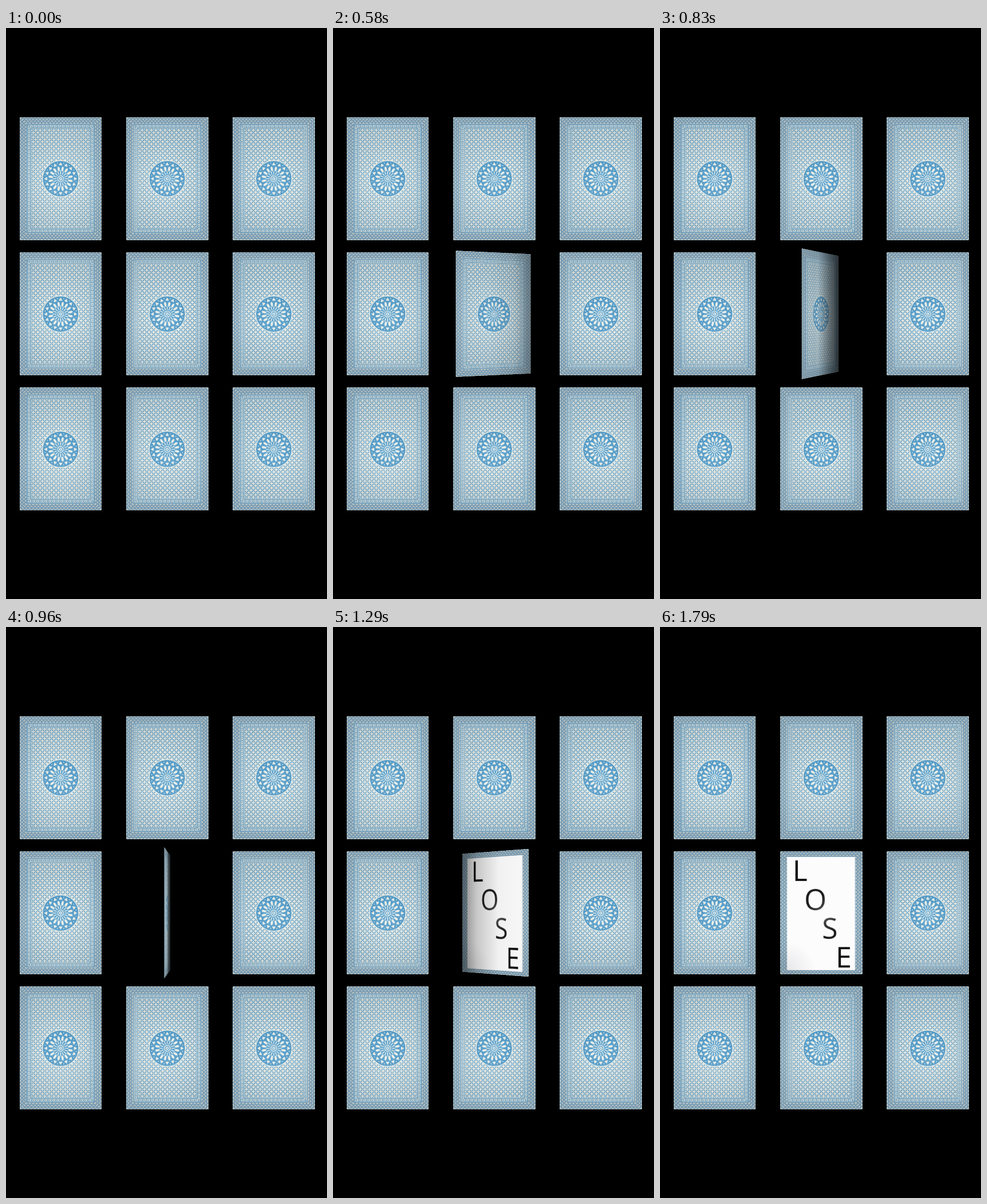
An HTML page with a canvas for the animation above (1830 ms loop, 561 by 998 pixels).

```html
<!DOCTYPE html>
<html lang="en">
<head>
<meta charset="utf-8">
<title>Card flip</title>
<style>
html, body { margin: 0; width: 100%; height: 100%; overflow: hidden; background: #000; }
canvas { display: block; }
</style>
</head>
<body>
<canvas id="stage" width="561" height="998"></canvas>
<script>
const LOOP = 1830, W = 143.4, H = 215, RES = 3, DEPTH = 1060;
const BLUE = '#5aa0cc', DEEP = '#6b9dc2', CREAM = '#f2f4ec';
const COLS = [23.8, 210.1, 396.4], ROWS = [155.5, 392, 628.4];
const ctx = document.getElementById('stage').getContext('2d');
ctx.imageSmoothingQuality = 'high';

function makeFace(paint) {
  const c = document.createElement('canvas');
  c.width = Math.round(W * RES);
  c.height = H * RES;
  const g = c.getContext('2d');
  g.scale(RES, RES);
  g.beginPath();
  g.roundRect(0, 0, W, H, 1.2);
  g.clip();
  paint(g);
  return c;
}

function rect(g, x, y, w, h, color) {
  g.fillStyle = color;
  g.fillRect(x, y, w, h);
}

function disc(g, x, y, r, color) {
  g.fillStyle = color;
  g.beginPath();
  g.arc(x, y, r, 0, Math.PI * 2);
  g.fill();
}

// Pointed leaf from (x, y) along an angle
function leaf(g, x, y, len, wide, angle, color) {
  g.save();
  g.translate(x, y);
  g.rotate(angle);
  g.fillStyle = color;
  g.beginPath();
  g.moveTo(0, 0);
  g.quadraticCurveTo(len / 2, wide, len, 0);
  g.quadraticCurveTo(len / 2, -wide, 0, 0);
  g.fill();
  g.restore();
}

function radial(g, x, y, r, from, to) {
  const grad = g.createRadialGradient(x, y, 0, x, y, r);
  grad.addColorStop(0, from);
  grad.addColorStop(1, to);
  rect(g, 0, 0, W, H, grad);
}

// One side of the frame, x along the edge and y inward
function side(g, len) {
  g.beginPath();
  g.moveTo(0, 0);
  g.lineTo(len, 0);
  g.lineTo(len - 21, 21);
  g.lineTo(21, 21);
  g.clip();
  rect(g, 0, 0, len, 21, DEEP);
  for (let row = 0; row < 4; row++) {
    const y = 1.2 + row * 3.1;
    for (let x = len / 2 % 6 - 6 + (row % 2) * 3; x < len; x += 6)
      leaf(g, x, y, 5.8, 2.3, 0, '#e2e5da');
  }
  rect(g, 0, 12, len, .9, '#e2e9e6');
  rect(g, 0, 12.9, len, 1.2, BLUE);
  rect(g, 0, 14.1, len, 4.6, CREAM);
  for (let x = len / 2 % 7 - 7; x < len; x += 7) {
    leaf(g, x, 14.3, 4.2, 1.1, Math.PI / 4, BLUE);
    leaf(g, x, 18.5, 4.2, 1.1, -Math.PI / 4, BLUE);
    leaf(g, x + 3.5, 16.4, 3.6, 1.6, 0, BLUE);
  }
  rect(g, 0, 18.7, len, 1.2, BLUE);
  rect(g, 0, 19.9, len, 1.1, CREAM);
}

function frame(g) {
  for (let i = 0; i < 4; i++) {
    g.save();
    g.translate(W / 2, H / 2);
    g.rotate(i * Math.PI / 2);
    const len = i % 2 ? H : W, off = i % 2 ? W : H;
    g.translate(-len / 2, -off / 2);
    side(g, len);
    g.restore();
  }
}

function lattice(g) {
  const x0 = 20, y0 = 19.5, nx = 13, ny = 22;
  const px = (W - 40) / nx, py = (H - 39) / ny;
  rect(g, 19, 18, W - 38, H - 36, '#f1f2e9');
  for (let j = 0; j < ny; j++)
    for (let i = 0; i < nx; i++)
      for (let k = 0; k < 4; k++)
        leaf(g, x0 + (i + .5) * px, y0 + (j + .5) * py, 5.6, 1.6, Math.PI / 4 + k * Math.PI / 2, BLUE);
}

function medallion(g) {
  const n = 16;
  g.save();
  g.translate(71.6, 108);
  disc(g, 0, 0, 32.2, CREAM);
  disc(g, 0, 0, 30.9, '#4c9aca');
  for (let i = 0; i < n; i++) {
    g.save();
    g.rotate(i * 2 * Math.PI / n);
    disc(g, 24.6, -1.3, 1.4, CREAM);
    disc(g, 24.6, 1.3, 1.4, CREAM);
    leaf(g, 24, 0, 4.6, 2.6, 0, CREAM);
    leaf(g, 5.5, 0, 10, 1.5, 0, CREAM);
    g.rotate(Math.PI / n);
    leaf(g, 12.5, 0, 9.5, 3.8, 0, CREAM);
    disc(g, 19.2, 0, 1.9, CREAM);
    disc(g, 27.6, 0, .8, CREAM);
    g.restore();
  }
  disc(g, 0, 0, 5.6, CREAM);
  disc(g, 0, 0, 4.4, BLUE);
  disc(g, 0, 0, 2.7, CREAM);
  disc(g, 0, 0, 1.2, BLUE);
  g.restore();
}

const back = makeFace(g => {
  lattice(g);
  frame(g);
  medallion(g);
  radial(g, 72, 125, 80, 'rgba(255,255,255,.14)', 'rgba(255,255,255,0)');
  radial(g, 72, 112, 135, 'rgba(60,85,105,0)', 'rgba(60,85,105,.26)');
});

const front = makeFace(g => {
  frame(g);
  radial(g, 72, 112, 135, 'rgba(60,85,105,0)', 'rgba(60,85,105,.26)');
  rect(g, 12, 10, 118.5, 197.4, '#fcfcfd');
  g.font = '50px "Open Sans", "Noto Sans", sans-serif';
  g.fillStyle = '#0a0a0a';
  g.fillText('L', 21.6, 52);
  g.fillText('E', 97, 203);
  g.fillStyle = '#1c1c1c';
  g.fillText('O', 42, 102.6);
  g.fillText('S', 73, 152.6);
  radial(g, 78, 110, 34, 'rgba(255,255,255,.28)', 'rgba(255,255,255,0)');
  radial(g, 12, 207, 48, 'rgba(90,90,100,.12)', 'rgba(90,90,100,0)');
});

// Shadow on the far half of a turned face
function shade(x0, x1, h, turn) {
  const sin = Math.abs(Math.sin(turn));
  if (sin < .005) return;
  const near = turn > 0 ? x0 : x1, far = turn > 0 ? x1 : x0;
  const grad = ctx.createLinearGradient(near, 0, far, 0);
  const stop = (p, a) => grad.addColorStop(p, `rgba(0,0,0,${a})`);
  const dim = .08 * sin ** 3;
  stop(0, dim);
  stop(.45, dim + .08 * sin ** 2);
  stop(.78, dim + .55 * sin ** 2);
  stop(1, dim + .72 * sin);
  ctx.fillStyle = grad;
  ctx.fillRect(x0 - 1, -h, x1 - x0 + 2, h * 2);
}

function flipCard(angle) {
  const isBack = angle < Math.PI / 2;
  const face = isBack ? back : front;
  const turn = isBack ? angle : angle - Math.PI;
  const sin = Math.sin(turn), cos = Math.cos(turn);
  if (cos < .004) return;
  const zoom = u => DEPTH / (DEPTH + u * sin);
  const half = W / 2, zl = zoom(-half), zr = zoom(half);
  const x0 = -half * cos * zl, x1 = half * cos * zr;
  const cx = COLS[1] + half, cy = ROWS[1] + H / 2;
  const toFace = x => {
    const u = x * DEPTH / (cos * DEPTH - x * sin);
    return Math.max(-half, Math.min(half, u));
  };
  ctx.save();
  ctx.translate(cx, cy);
  ctx.beginPath();
  ctx.moveTo(x0, -H / 2 * zl);
  ctx.lineTo(x1, -H / 2 * zr);
  ctx.lineTo(x1, H / 2 * zr);
  ctx.lineTo(x0, H / 2 * zl);
  ctx.clip();
  for (let px = Math.floor(cx + x0); px < cx + x1; px++) {
    const x = px - cx, a = toFace(x), b = toFace(x + 1);
    const h = H * zoom((a + b) / 2);
    const sw = Math.max(.5, (b - a) * RES);
    const sx = Math.min((a + half) * RES, face.width - sw);
    ctx.drawImage(face, sx, 0, sw, face.height, x, -h / 2, 1, h);
  }
  shade(x0, x1, H, turn);
  ctx.restore();
}

// Ease in and out, centred on 980 ms
function angleAt(ms) {
  const u = Math.max(0, Math.min(1, (ms - 245) / 1470));
  return Math.PI * u * u * (3 - 2 * u);
}

// 24 pictures per second, start times rounded to 10 ms
function stepAt(ms) {
  const start = k => Math.round(k * 25 / 6) * 10;
  let k = Math.min(43, Math.floor(ms * 24 / 1000) + 1);
  while (start(k) > ms) k--;
  return k;
}

let shown = -1;
function draw(now) {
  const k = stepAt(now % LOOP);
  if (k !== shown) {
    shown = k;
    rect(ctx, 0, 0, 561, 998, '#000');
    ROWS.forEach((y, r) => COLS.forEach((x, c) => {
      if (r !== 1 || c !== 1) ctx.drawImage(back, x, y, W, H);
    }));
    const angle = angleAt(k * 1000 / 24);
    if (angle === 0 || angle === Math.PI)
      ctx.drawImage(angle ? front : back, COLS[1], ROWS[1], W, H);
    else flipCard(angle);
  }
}

let origin;
function tick(now) {
  origin ??= now;
  draw(Math.max(0, now - origin));
  requestAnimationFrame(tick);
}
draw(0);
requestAnimationFrame(tick);
</script>
</body>
</html>
```
